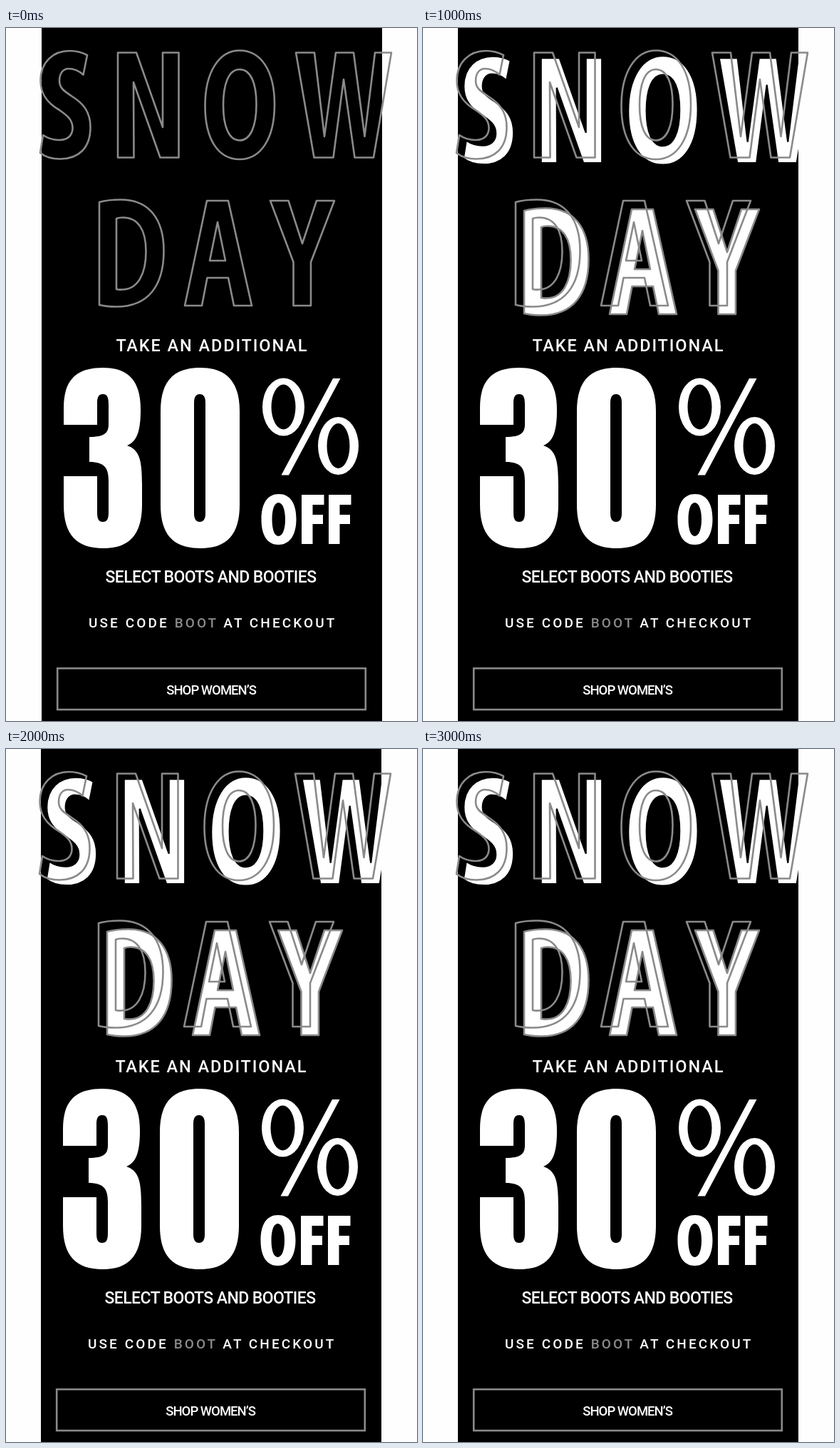
Animation, 577 px wide and 971 px high, one loop 3.5 s. Source, as an HTML page:

```html
<!DOCTYPE html>
<html lang="en">
<head>
<meta charset="utf-8">
<title>Snow Day</title>
<style>
  html, body { margin: 0; width: 100%; height: 100%; overflow: hidden; background: #fefefe; }
  svg { display: block; }
  text { font-family: Roboto, "Open Sans", sans-serif; font-weight: 500; white-space: pre; }
  .line { fill: none; stroke: #8a8a8a; stroke-width: 2.6; stroke-linejoin: round; }
</style>
</head>
<body>
<svg width="577" height="971" viewBox="0 0 577 971" fill="#fff" fill-rule="evenodd">
  <defs>
    <clipPath id="panel"><path d="M49 0H527V971H49Z"/></clipPath>
    <g id="snow" role="img" aria-label="SNOW">
      <path d="M113 38L107.500 65.500Q98 57 87 57C78 57 74 65 74 74C74 84 80 88 92 96C108 106 117.500 118 117.500 139C117.500 169 100 183.500 75 183.500C62 183.500 52 179 47 175L51 150Q61 157 74 157C86 157 92.500 150 92.500 140C92.500 128 84 122 74 115C55 104 47.500 91 47.500 74C47.500 47 66 32 88 32Q102 32 113 38Z"/>
      <path d="M156 34.5H182L219 139V34.5H241.500V181.500H215.500L178 76L178.500 181.500H156Z"/>
      <path d="M327 31.500C357 31.500 376 60 376 107C376 156 356 184 327 184C297 184 278.500 156 278.500 109C278.500 62 298 31.500 327 31.500ZM327 58C311 58 304 80 304 108C304 138 312 157.500 327 157.500C342 157.500 350.500 138 350.500 107C350.500 78 343 58 327 58Z"/>
      <path d="M406 34.5H432L446 152L462 34.5H487L502.500 152L517 34.5H540L515 181.500H488.500L473 72L458.500 181.500H431.500Z"/>
    </g>
    <g id="day" role="img" aria-label="DAY">
      <path d="M130 244Q142 240.500 160 240.500C200 240.500 220.500 268 220.500 312C220.500 362 198 390.500 154 390.500Q140 390.500 130 388ZM154 267V366Q158 367 162 366.500C184 366 195.500 345 195.500 313C195.500 282 184 265.500 163 265.500Q158 265.500 154 267Z"/>
      <path d="M281 242H311L344 389H319L311 350H281.500L274 389H250ZM296 272L307 326H285Z"/>
      <path d="M370 242H395.500L415 302L435 242H460L427 328V389H402.500V328Z"/>
    </g>
    <path id="f" d="M414 654H445.500V668H429.500V682H444V695H429.500V723H414Z"/>
  </defs>

  <g id="stage">
    <path fill="#000" d="M49 0H527V971H49Z"/>

    <g clip-path="url(#panel)">
      <use id="snowFill" href="#snow" x="9.700" y="7.700" stroke="#000" stroke-width="2.200"/>
    </g>
    <use class="line" href="#snow"/>
    <g id="dayFill">
      <use href="#day" x="12" y="12"/>
      <use class="line" href="#day" x="12" y="12"/>
    </g>
    <use class="line" href="#day"/>

    <text x="153.500" y="453" font-size="23.500" letter-spacing="1.900">TAKE AN ADDITIONAL</text>

    <g role="img" aria-label="30% OFF">
      <path d="M80 556V532C80 495 96 476 135 476C172 476 188 495 188 535C188 562 184 579 169 585C186 591 190 604 190 640V668C190 710 172 729 136 729C98 729 80 710 80 668V628H127V678C127 688 129 692 135 692C141 692 143 688 143 678V635C143 617 138 608 116 608V573C138 573 143 567 143 555V528C143 517 141 513 135 513C129 513 127 517 127 526V556Z"/>
      <path d="M216 537C216 495 234 476 272 476C308 476 327 495 327 537V668C327 710 309 729 272 729C234 729 216 710 216 668ZM263 525Q263 513 271 513Q279 513 279 525V680Q279 692 271 692Q263 692 263 680Z"/>
      <path d="M359 531a29.500 40.500 0 0 1 59 0a29.500 40.500 0 0 1 -59 0ZM371.500 531a17 31.500 0 0 0 34 0a17 31.500 0 0 0 -34 0Z"/>
      <path d="M437 585.500a28.500 40.500 0 0 1 57 0a28.500 40.500 0 0 1 -57 0ZM449.500 585.500a16 31.500 0 0 0 32 0a16 31.500 0 0 0 -32 0Z"/>
      <path d="M458 491H468.500L396 626.500H385.500Z"/>
      <path d="M357.500 688.500C357.500 666 366 653 382 653C398 653 406.500 666 406.500 688C406.500 711 397 724 381.500 724C366 724 357.500 711 357.500 688.500ZM372.500 688.500C372.500 703 376 712 381.500 712C387 712 391 703 391 688.500C391 674 387 665 381.500 665C376 665 372.500 674 372.500 688.500Z"/>
      <use href="#f"/>
      <use href="#f" x="38"/>
    </g>

    <text x="138.500" y="777" font-size="23" letter-spacing="-0.580">SELECT BOOTS AND BOOTIES</text>
    <text x="115" y="840" font-size="19" letter-spacing="3.100">USE CODE <tspan fill="#8a8a8a">BOOT</tspan> AT CHECKOUT</text>
    <rect class="line" x="71.200" y="897.200" width="432.600" height="57.800" style="stroke-linejoin:miter"/>
    <text x="224.300" y="933.500" font-size="18.500" letter-spacing="-1">SHOP WOMEN’S</text>
  </g>
</svg>
<script>
  const STEP = 500;
  // Each beat shows the filled words that are lit: S = SNOW, D = DAY.
  const beats = ["", "S", "SD", "", "SD", "", "SD"];
  const get = id => document.getElementById(id);
  const stage = get("stage"), snow = get("snowFill"), day = get("dayFill");
  const show = (el, on) => el.setAttribute("visibility", on ? "visible" : "hidden");

  function draw(now) {
    const beat = Math.floor(now / STEP) % beats.length;
    show(snow, beats[beat].includes("S"));
    show(day, beats[beat].includes("D"));
    stage.setAttribute("transform", `translate(${beat ? 0 : 1})`);
    requestAnimationFrame(draw);
  }
  draw(performance.now());
</script>
</body>
</html>
```
